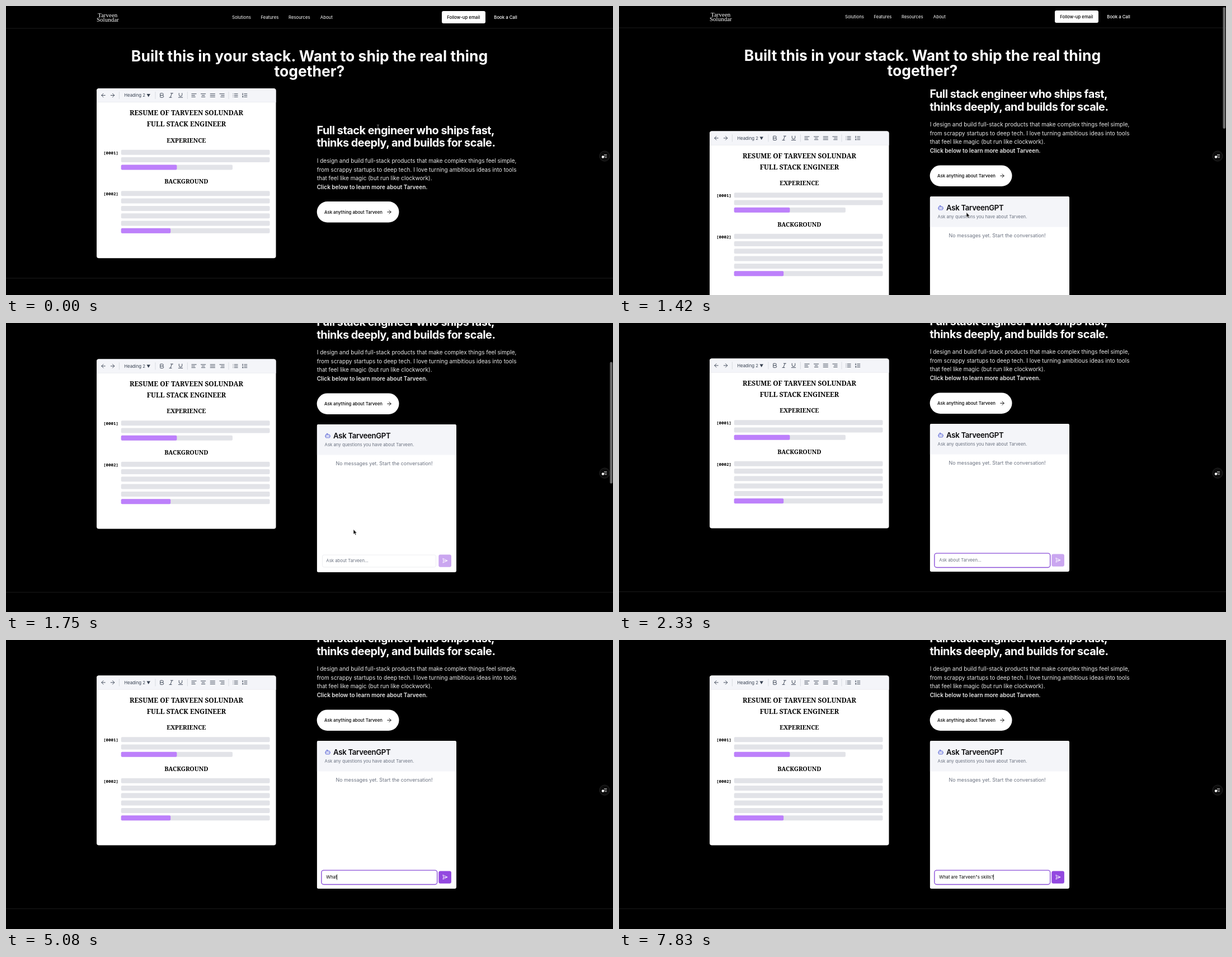
Write an HTML page that moves like this. It is 1085 px wide and 516 px high and loops after 8 s.

```html
<!DOCTYPE html>
<html lang="en">
<head>
<meta charset="utf-8">
<title>Portfolio with chat</title>
<style>
  html, body { margin: 0; width: 100%; height: 100%; overflow: hidden; background: #000; }
  svg { display: block; }
  text { font: 400 7.78px Inter, sans-serif; font-optical-sizing: none; fill: #fff; white-space: pre; }
  .medium { font-weight: 500; }
  .dark { fill: #000; }
  .h1 { font-size: 26.5px; font-weight: 700; text-anchor: middle; }
  .h2 { font-size: 19.87px; font-weight: 700; letter-spacing: -.025em; }
  .body { font-size: 10.02px; fill: #e8e8e8; }
  .strong { font-weight: 600; }
  .brand { font: 11px "Liberation Serif", serif; }
  .doc { font: 700 11.9px "Noto Serif", serif; fill: #000; text-anchor: middle; }
  .section { font-size: 10.7px; }
  .mono { font: 600 7.5px "Noto Sans Mono", monospace; fill: #000; }
  .title { font-size: 13.25px; font-weight: 600; letter-spacing: -.025em; fill: #09090b; }
  .muted { fill: #6b7280; }
  .slate { fill: #374151; }
  .note { font-size: 8.92px; }
  .icon { fill: none; stroke-width: 2; stroke-linecap: round; stroke-linejoin: round; }
</style>
</head>
<body>
<svg width="100%" height="100%" viewBox="0 0 1085 516">
  <g id="page">
    <text class="brand" x="164" y="19.5">Tarveen</text>
    <text class="brand" x="162" y="27.5" font-style="italic">Solundar</text>
    <text x="404" y="22.8">Solutions</text>
    <text x="455.5" y="22.8">Features</text>
    <text x="505" y="22.8">Resources</text>
    <text x="561.8" y="22.8">About</text>
    <rect x="779" y="9" width="78" height="22" rx="3" fill="#fff"/>
    <text class="medium dark" x="788.3" y="22.8">Follow-up email</text>
    <text class="medium" x="872.3" y="22.8">Book a Call</text>
    <rect y="39.5" width="1085" height="1" fill="#1c1c1c"/>

    <text class="h1" x="542.5" y="98.8">Built this in your stack. Want to ship the real thing</text>
    <text class="h1" x="542.5" y="125.5">together?</text>

    <g id="card">
      <rect x="162" y="147.2" width="320.5" height="303" rx="4" fill="#fff"/>
      <path d="M162 172v-20.8a4 4 0 0 1 4-4h312.5a4 4 0 0 1 4 4V172z" fill="#f4f5f9"/>
      <rect x="162" y="171.5" width="320.5" height=".6" fill="#e5e7eb"/>
      <text class="slate" x="211.3" y="162.4">Heading 2</text>
      <path class="slate" d="M251.5 157h6.4l-3.2 5.6z"/>
      <g id="toolbar"></g>
      <text class="doc" x="322.5" y="195.2">RESUME OF TARVEEN SOLUNDAR</text>
      <text class="doc" x="322.5" y="215.2">FULL STACK ENGINEER</text>
      <text class="doc section" x="322.3" y="243.8">EXPERIENCE</text>
      <text class="doc section" x="322.3" y="317.3">BACKGROUND</text>
      <text class="mono" x="174" y="264.8">[0001]</text>
      <text class="mono" x="174" y="338.3">[0002]</text>
      <g id="bars"></g>
    </g>

    <g id="side">
      <text class="h2" x="555.5" y="229">Full stack engineer who ships fast,</text>
      <text class="h2" x="555.5" y="251.2">thinks deeply, and builds for scale.</text>
      <text class="body" x="555.7" y="279.9">I design and build full-stack products that make complex things feel simple,</text>
      <text class="body" x="555.7" y="295.5">from scrappy startups to deep tech. I love turning ambitious ideas into tools</text>
      <text class="body" x="555.7" y="311">that feel like magic (but run like clockwork).</text>
      <text class="body strong" x="555.7" y="326.6">Click below to learn more about Tarveen.</text>
      <rect x="555.7" y="349" width="146.8" height="37.5" rx="18.75" fill="#fff"/>
      <text class="medium dark" x="569" y="370.6">Ask anything about Tarveen</text>
      <path class="icon" stroke="#000" transform="translate(679.4 362.3) scale(.46)" d="M5 12h14M12 5l7 7-7 7"/>

      <svg id="panel" x="555.7" y="404.5" width="249.3" height="264">
        <rect width="249.3" height="264" rx="3" fill="#fff"/>
        <path d="M0 54.5V3a3 3 0 0 1 3-3h243.3a3 3 0 0 1 3 3v51.5z" fill="#f4f5f9"/>
        <path class="icon" stroke="#4f5bd5" transform="translate(13.8 14.7) scale(.46)"
          d="M12 8V4H8M6 8h12a2 2 0 0 1 2 2v8a2 2 0 0 1-2 2H6a2 2 0 0 1-2-2v-8a2 2 0 0 1 2-2zM2 14h2M20 14h2M15 13v2M9 13v2"/>
        <text class="title" x="29.3" y="25.3">Ask TarveenGPT</text>
        <text class="muted" x="13.9" y="39">Ask any questions you have about Tarveen.</text>
        <text class="muted note" x="33.8" y="73.5">No messages yet. Start the conversation!</text>
        <rect id="field" fill="#fff"/>
        <text id="entry" x="16.6" y="246.5"></text>
        <rect id="caret" y="238.5" width=".8" height="10"/>
        <rect id="send" x="217.6" y="232.6" width="22.6" height="22.2" rx="3"/>
        <path class="icon" stroke="#fff" transform="translate(224 238.7) scale(.41)"
          d="M3 3l3 9-3 9 19-9zM6 12h16"/>
      </svg>
    </g>
    <rect id="footer" y="485.5" width="1085" height="1" fill="#1c1c1c"/>
  </g>

  <circle cx="1070" cy="268" r="9" fill="#0c0c0c" stroke="#262626"/>
  <path d="M1069 265.5h5M1069 268h5M1070 270.5h4" stroke="#ddd" stroke-width=".9"/>
  <circle cx="1067" cy="269.5" r="2.2" fill="#fff"/>
  <rect id="thumb" x="1079.5" width="4.5" height="217" rx="2.2" fill="#6b6b6b"/>

  <g id="pointer">
    <path id="beam" d="M-2-5q2 0 2 1.5q0-1.5 2-1.5M0-3.5v7M-2 5q2 0 2-1.5q0 1.5 2 1.5" fill="none" stroke="#8a8a8a" stroke-width=".9"/>
    <path id="hand" d="M-1-4q1-1 2 0v3.500l4 1v3.5l-1.5 3h-4l-3.500-4 1-1 2 1z" stroke="#fff" stroke-width=".7"/>
    <path id="arrow" d="M0-4.5v8.8l2-1.8 1.5 3.2 1.5-.7-1.4-3.1h2.6z" fill="#111" stroke="#fff" stroke-width=".6"/>
  </g>
</svg>

<script>
const LOOP = 8000, FRAME = 1000 / 12;
const FOCUS = 2160;
const QUESTION = 'What are Tarveen"s skills?';
const el = Object.fromEntries([...document.querySelectorAll('[id]')].map(e => [e.id, e]));

// Toolbar icons on a 24 unit grid: centre x, path
const TOOLS = [
  [174, 'M19 12H5M12 19l-7-7 7-7'],
  [190.5, 'M5 12h14M12 5l7 7-7 7'],
  [278.5, 'M6 12h9a4 4 0 0 1 0 8H7a1 1 0 0 1-1-1V5a1 1 0 0 1 1-1h7a4 4 0 0 1 0 8'],
  [295.2, 'M19 4h-9M14 20H5M15 4L9 20'],
  [312, 'M6 4v6a6 6 0 0 0 12 0V4M4 20h16'],
  [336, 'M3 6h18M3 12h12M3 18h14'],
  [352.6, 'M3 6h18M7 12h10M5 18h14'],
  [369.3, 'M3 6h18M3 12h18M3 18h18'],
  [386, 'M3 6h18M9 12h12M7 18h14'],
  [410, 'M8 6h13M8 12h13M8 18h13M3 6h.01M3 12h.01M3 18h.01'],
  [426.7, 'M10 6h11M10 12h11M10 18h11M4 4v5M3 9h2M3 15h3l-3 4h3']
];
el.toolbar.innerHTML = TOOLS.map(([x, d]) =>
  `<path class="icon" stroke="#374151" transform="translate(${x} 159.5) scale(.46) translate(-12 -12)" d="${d}"/>`).join('') +
  [202.3, 267, 324.3, 398].map(x => `<rect x="${x - .4}" y="153" width=".8" height="13" fill="#d1d5db"/>`).join('');

const bar = (y, width, color = '#e2e3e8') =>
  `<rect x="205.7" y="${y}" width="${width}" height="9" rx="2" fill="${color}"/>`;
const bars = (top, widths, marked) =>
  widths.map((w, i) => bar(top + i * 13.3, w)).join('') + bar(top + (widths.length - 1) * 13.3, marked, '#bd80fb');
el.bars.innerHTML = bars(256.8, [265.8, 265.8, 199.3], 99.7) + bars(330.3, Array(6).fill(265.8), 88.5);

// Linear interpolation through [time, value] points
function track(t, points) {
  if (t <= points[0][0]) return points[0][1];
  for (let i = 1; i < points.length; i++) {
    const [t0, v0] = points[i - 1], [t1, v1] = points[i];
    if (t < t1) return v0 + (v1 - v0) * (t - t0) / (t1 - t0);
  }
  return points.at(-1)[1];
}
const set = (node, attrs) => { for (const k in attrs) node.setAttribute(k, attrs[k]); };
const shift = (node, x, y) => set(node, { transform: `translate(${x} ${y})` });
const show = (node, on) => set(node, { visibility: on ? 'visible' : 'hidden' });

function drawLayout(t) {
  const scroll = track(t, [[1334, 0], [1417, 1], [1500, 62], [1583, 128], [1667, 150], [1750, 160], [1833, 161]]);
  const p = track(t, [[580, 0], [1160, 1]]);
  const open = p * p * (3 - 2 * p);
  const growth = 282 * open;
  const down = Math.max(0, growth / 2 - 63.6);
  shift(el.page, 0, -scroll);
  shift(el.card, 0, down);
  shift(el.side, 0, -Math.min(growth / 2, 63.6));
  shift(el.footer, 0, 2 * down);
  set(el.panel, { height: 264 * open, opacity: open });
  show(el.panel, open > 0);
  show(el.thumb, t > 1330 && t < FOCUS);
  set(el.thumb, { y: 1.6 + scroll * .425 });
}

function drawInput(t) {
  const focused = t > FOCUS;
  set(el.field, focused
    ? { x: 8.2, y: 231.2, width: 206.8, height: 25.4, rx: 4, stroke: '#8a4fd8', 'stroke-width': 1.4 }
    : { x: 9.8, y: 233.2, width: 203, height: 21.8, rx: 3, stroke: '#e5e7eb', 'stroke-width': .7 });

  const typed = Math.floor(.01 + track(t, [[4749, 0], [4833, 1], [5083, 4], [5333, 7], [5500, 8],
    [6250, 16], [6500, 18], [6667, 19], [7333, 25], [7500, 26]]));
  el.entry.textContent = typed ? QUESTION.slice(0, typed) : 'Ask about Tarveen...';
  set(el.entry, { class: typed ? 'dark' : 'muted' });
  const blinkOn = Math.floor((t - FOCUS) / 500) % 2 === 1;
  show(el.caret, focused && (typed || blinkOn));
  set(el.caret, { x: 16.4 + (typed ? el.entry.getComputedTextLength() : 0) });

  const active = track(t, [[4750, 0], [5000, 1]]);
  const mix = (a, b) => Math.round(a + (b - a) * active);
  set(el.send, { fill: `rgb(${mix(202, 147)},${mix(166, 73)},${mix(240, 224)})` });
}

function drawPointer(t) {
  const x = track(t, [[167, 665], [250, 655], [333, 646], [417, 646], [500, 621], [1750, 621], [2083, 640]]);
  const y = track(t, [[167, 217], [250, 262], [333, 309], [417, 309], [500, 373], [1750, 373], [2083, 423]]);
  const shape = t < 490 || t > 2000 ? 'beam' : t < 800 ? 'hand' : 'arrow';
  shift(el.pointer, x, y);
  for (const name of ['beam', 'hand', 'arrow']) show(el[name], name === shape && t < FOCUS);
}

function draw(now) {
  // The motion advances in steps of a twelfth of a second
  const t = Math.floor((now % LOOP + 5) / FRAME) * FRAME;
  drawLayout(t);
  drawInput(t);
  drawPointer(t);
}

let start;
function tick(now) {
  start ??= now;
  draw(now - start);
  requestAnimationFrame(tick);
}
draw(0);
requestAnimationFrame(tick);
</script>
</body>
</html>
```
